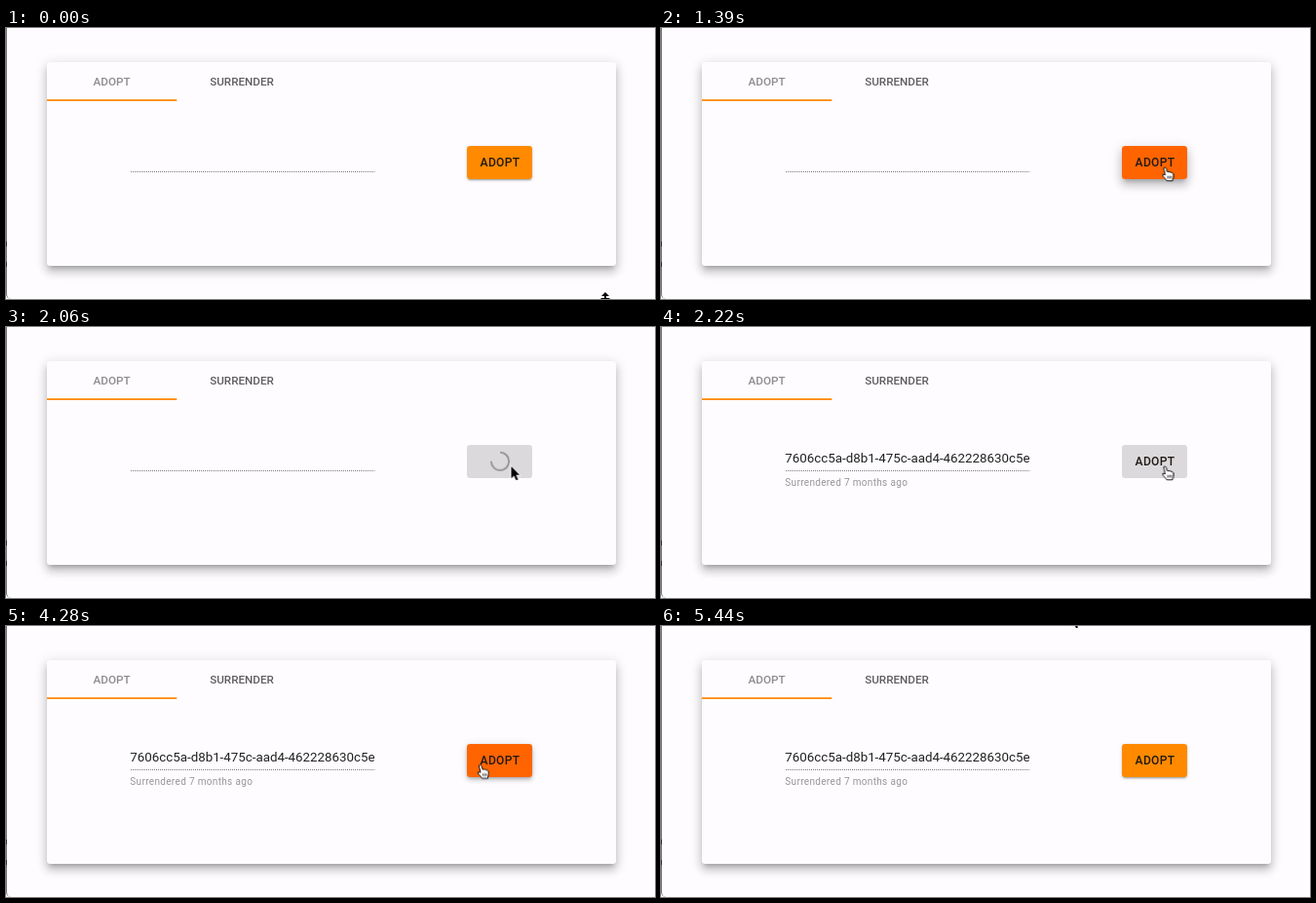
These frames come from a looping animation (666x278 px, 5490 ms). An HTML page:

```html
<!DOCTYPE html>
<html lang="en">
<head>
<meta charset="utf-8">
<title>Adopt or surrender</title>
<style>
  :root {
    --loop: 5490ms;
    --low: 0 2.5px .8px -1.7px #0003, 0 1.7px 1.7px 0 #00000024, 0 .8px 4.2px 0 #0000001f;
    --mid: 0 1.7px 3.3px -.8px #0003, 0 3.3px 4.2px 0 #00000024, 0 .8px 8.3px 0 #0000001f;
    --high: 0 4.2px 4.2px -2.5px #0003, 0 6.7px 8.3px .8px #00000024, 0 2.5px 11.7px 1.7px #0000001f;
    --flat: 0 0 0 0 #0000, 0 0 0 0 #0000, 0 0 0 0 #0000;
  }
  html, body { margin: 0; width: 100%; height: 100%; overflow: hidden; }
  body { position: relative; background: #fefcff; }
  .edge, .card, .button, svg { position: absolute; }
  .edge {
    left: 0; top: 0; width: 8px; height: 278px; box-sizing: border-box;
    border-left: 1px solid #777; border-bottom-left-radius: 5px;
  }
  .card {
    left: 42px; top: 35px; width: 584px; height: 209px;
    border-radius: 3.3px; background: #fefcff; box-shadow: var(--high);
  }
  .button {
    left: 473px; top: 121px; width: 67px; height: 33.5px; border-radius: 3.3px;
    animation: button var(--loop) cubic-bezier(.4, 0, .2, 1) infinite;
  }
  svg { left: 0; top: 0; width: 666px; height: 278px; overflow: hidden; }
  text { font-family: Roboto, Arial, sans-serif; }
  .tab { font-size: 11.67px; font-weight: 500; text-anchor: middle; }
  .label { font-size: 12px; font-weight: 500; letter-spacing: .35px; text-anchor: middle; fill: #211a14; }
  .id { font-size: 13.33px; fill: #212121; }
  .hint { font-size: 10px; letter-spacing: .333px; fill: #979598; }

  .label, .result, .busy, .arrow, .hand, .resize, .cursor {
    animation: var(--loop) step-end infinite;
  }
  .label { animation-name: idle; }
  .busy { animation-name: busy; }
  .result { animation-name: result; }
  .cursor { animation-name: move; }
  .arrow { animation-name: arrow; }
  .hand { animation-name: hand; }
  .resize { animation-name: resize; }
  .spin {
    fill: none; stroke: #949296; stroke-width: 1.8;
    animation: spin var(--loop) linear infinite, grow var(--loop) ease-in-out infinite;
  }

  /* rest, hover, press, disabled, hover, rest */
  @keyframes button {
    0%, 14.3%, 83.97%, 100% { background: #ff8a00; box-shadow: var(--low); }
    19.7%, 21.31% { background: #ff6400; box-shadow: var(--mid); }
    24.8%, 26.41% { background: #ff6400; box-shadow: var(--high); }
    30.42%, 31.33% { background: #ff6400; box-shadow: var(--mid); }
    35.88%, 40.44% { background: #dbd9dc; box-shadow: var(--flat); }
    44.44%, 78.87% { background: #ff6400; box-shadow: var(--mid); }
  }
  @keyframes idle { 0%, 40.44% { opacity: 1; } 31.33% { opacity: 0; } }
  @keyframes busy { 0%, 40.44% { opacity: 0; } 31.33% { opacity: 1; } }
  @keyframes result { 0% { opacity: 0; } 40.44%, 100% { opacity: 1; } }
  @keyframes spin {
    0%, 31.33% { transform: rotate(-177deg); }
    40.44%, 100% { transform: rotate(-48deg); }
  }
  @keyframes grow {
    0%, 31.33% { stroke-dasharray: 3 60; }
    37.5% { stroke-dasharray: 43 60; }
    40.44%, 100% { stroke-dasharray: 45 60; }
  }

  @keyframes resize { 0% { opacity: 1; } 1.09%, 100% { opacity: 0; } }
  @keyframes arrow {
    0%, 15.11%, 40.44% { opacity: 0; }
    1.09%, 31.33%, 78.87%, 100% { opacity: 1; }
  }
  @keyframes hand {
    0%, 31.33%, 78.87%, 100% { opacity: 0; }
    15.11%, 40.44% { opacity: 1; }
  }
  @keyframes move {
    0% { transform: translate(615px, 271px); }
    1.09% { transform: translate(611px, 266px); }
    2% { transform: translate(606px, 257px); }
    3.09% { transform: translate(601px, 249px); }
    4% { transform: translate(599px, 245px); }
    5.1% { transform: translate(598px, 243px); }
    11.11% { transform: translate(592px, 232px); }
    12.02% { transform: translate(572px, 200px); }
    13.11% { transform: translate(552px, 173px); }
    14.2% { transform: translate(540px, 160px); }
    15.11% { transform: translate(531px, 152px); }
    16.21% { transform: translate(524px, 147px); }
    17.3% { transform: translate(520px, 144px); }
    18.21% { transform: translate(518.5px, 143px); }
    77.96% { transform: translate(488px, 142.5px); }
    78.87% { transform: translate(466px, 138px); }
    79.96% { transform: translate(446px, 131px); }
    80.87% { transform: translate(432px, 126px); }
    81.97% { transform: translate(426px, 124px); }
    94.17% { transform: translate(425px, 123.5px); }
    95.08% { transform: translate(424px, 123px); }
    98.18% { transform: translate(423px, 60px); }
    99.09%, 100% { transform: translate(421px, -12px); }
  }
</style>
</head>
<body>
<div class="edge"></div>
<div class="card"></div>
<div class="button"></div>
<svg viewBox="0 0 666 278">
  <defs><clipPath id="field"><rect x="127" y="122" width="251.6" height="24"/></clipPath></defs>
  <path d="M.5 219v5M.5 240v5" stroke="#333"/>

  <text class="tab" x="108.6" y="59" fill="#8d8b8e">ADOPT</text>
  <text class="tab" x="242" y="59" fill="#5f5d60">SURRENDER</text>
  <rect x="42" y="73.2" width="133.3" height="1.8" fill="#ff8a00"/>

  <path d="M128 147.5H378.5" stroke="#777" stroke-dasharray="1 1"/>
  <g class="result">
    <text class="id" x="127.3" y="139" clip-path="url(#field)">7606cc5a-d8b1-475c-aad4-462228630c5e</text>
    <text class="hint" x="127.3" y="163">Surrendered 7 months ago</text>
  </g>

  <text class="label" x="507" y="142.2">ADOPT</text>
  <g class="busy" transform="translate(507 137.8)"><circle class="spin" r="9.2"/></g>

  <g class="cursor">
    <path class="resize" d="M0 0L4 4H1V6H4.500V7.500H-4.500V6H-1V4H-4Z" fill="#000" stroke="#fff" stroke-width="1" paint-order="stroke"/>
    <path class="arrow" d="M0 0V12.200L2.800 9.500L5 14.300L7 13.400L4.900 8.800H8.600Z" fill="#000" stroke="#fff" stroke-width="1.400" paint-order="stroke"/>
    <g class="hand" stroke="#000" stroke-width=".9" stroke-linejoin="round">
      <path fill="#fff" d="M-2.600 .9Q-2.400 -.3 -1.200 0Q-.3 .2 0 1.300L1 4.600Q2 3.900 2.900 4.800Q4 4.200 4.800 5.200Q6.200 4.800 6.900 6.400Q7.600 8.600 7 10.600L6.400 13.800H.6Q-.6 12 -2 10.600Q-3.600 9 -4 7.800Q-3.400 6.400 -1.600 7.600L-1 7.900Z"/>
      <path fill="none" stroke-width=".7" d="M1.600 8.700V11.500M3.300 8.700V11.500M5 8.700V11.500"/>
    </g>
  </g>
</svg>
</body>
</html>
```
